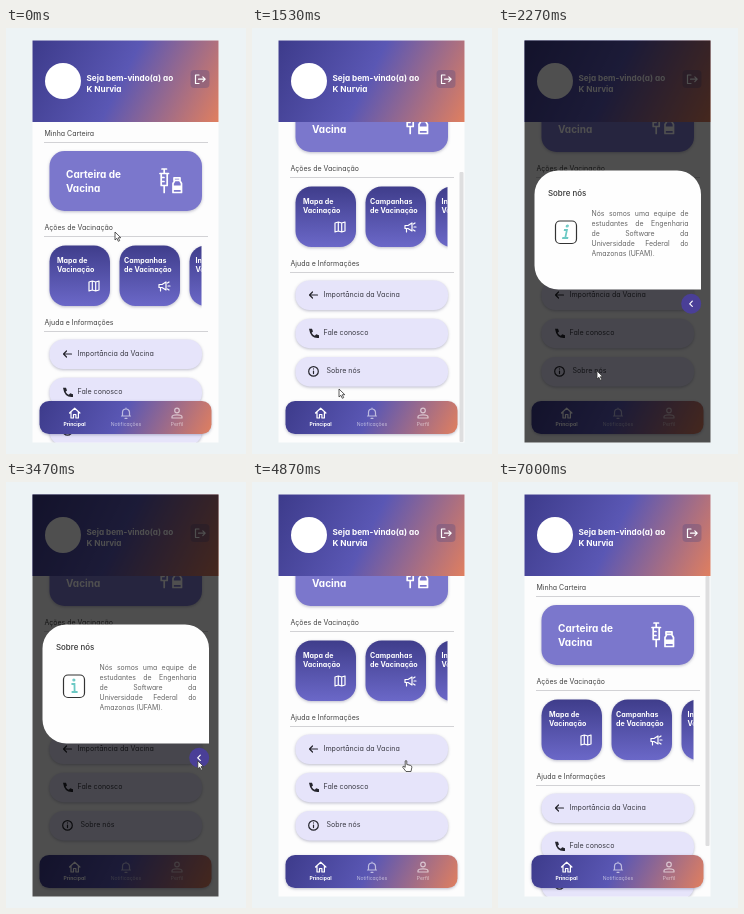
An HTML page that plays this animation: 240 px wide and 426 px high, repeating every 7070 ms.

```html
<!DOCTYPE html>
<html lang="pt-BR">
<head>
<meta charset="utf-8">
<title>Carteira de Vacina</title>
<style>
html, body { margin: 0; width: 100%; height: 100%; overflow: hidden; background: #edf3f5; }
svg.stage { display: block; width: 100%; height: 100%; }
text, p { font-family: Inter, "Open Sans", sans-serif; font-feature-settings: "cv11"; }
.bold { font-weight: 650; fill: #fff; }
.head { font-size: 7px; fill: #444; }
.item { font-size: 7.1px; fill: #3a3a44; }
.tile { font-size: 7.1px; }
.nav { font-size: 5.1px; text-anchor: middle; fill: #fff; }
.line { fill: none; stroke: #fff; stroke-width: 1.2; stroke-linecap: round; stroke-linejoin: round; }
.thick { stroke-width: 1.7; }
.dark { stroke: #25252d; }
.lift { filter: drop-shadow(0 1px 1.5px rgba(40, 40, 90, .3)); }
p { margin: 0; font-size: 6.9px; line-height: 10px; color: #666; }
p span { display: block; text-align: justify; text-align-last: justify; white-space: nowrap; }
p span:last-child { text-align-last: left; }
</style>
</head>
<body>
<svg class="stage" viewBox="0 0 240 426" xmlns="http://www.w3.org/2000/svg">
  <defs>
    <linearGradient id="brand">
      <stop offset="0" stop-color="#3d3b8b"/>
      <stop offset=".48" stop-color="#5a57b4"/>
      <stop offset="1" stop-color="#e07f5f"/>
    </linearGradient>
    <linearGradient id="top" href="#brand" gradientUnits="userSpaceOnUse" x1="29" y1="8" x2="210" y2="99"/>
    <linearGradient id="foot" href="#brand" gradientUnits="userSpaceOnUse" x1="44" y1="352" x2="195" y2="427"/>
    <linearGradient id="deep" x2="0" y2="1">
      <stop offset="0" stop-color="#3f3d8b"/>
      <stop offset="1" stop-color="#6b68c8"/>
    </linearGradient>
    <clipPath id="view"><rect x="26.500" y="94" width="186" height="320.500"/></clipPath>
    <clipPath id="row"><rect x="38" y="212" width="157.500" height="72"/></clipPath>
  </defs>

  <rect x="26.500" y="12.500" width="186" height="402" fill="#fdfdfd"/>

  <g clip-path="url(#view)">
    <g id="page">
      <g id="heads"></g>
      <rect class="lift" x="43.500" y="123" width="152.500" height="60" rx="15" fill="#7b77cc"/>
      <g class="bold" font-size="10">
        <text x="60" y="149.500">Carteira de</text>
        <text x="60" y="163.500">Vacina</text>
      </g>
      <path class="line thick" d="M156 141h4.500M158.200 141v4M154 145.500h8.500M155.200 145.500v12h6v-12M155.500 149.500h2.500M155.500 153.500h2.500M158.200 158v6.500"/>
      <path class="line thick" d="M168 149.800h6v2.500h-6zM168.500 153l-1.500 2.500v9h8.500v-9l-1.500-2.500"/>
      <path d="M167 157.500h8.500v4.500h-8.500z" fill="#fff"/>
      <g clip-path="url(#row)" id="tiles"></g>
      <g id="items"></g>
    </g>
    <rect id="bar" x="207.500" y="94" width="4" height="270" rx="1" fill="#dededf"/>
  </g>

  <rect x="26.500" y="12.500" width="186" height="81.500" fill="url(#top)"/>
  <circle cx="57" cy="53" r="18" fill="#fff"/>
  <g class="bold" font-size="8.200">
    <text x="80.500" y="53">Seja bem-vindo(a) ao</text>
    <text x="80.500" y="64">K Nurvia</text>
  </g>
  <rect x="184.500" y="42" width="19" height="18" rx="4" fill="#554a80" opacity=".35"/>
  <path class="line" d="M193 47h-3.500v8.500h3.500M192.500 51.200h6.500M196.800 48.800l2.400 2.400l-2.400 2.400"/>

  <rect class="lift" x="33.500" y="373" width="172" height="33" rx="9.500" fill="url(#foot)"/>
  <g>
    <path class="line" d="M63.500 385l5.200-4.800l5.200 4.800M65 384v6h2.500v-3.500h2.400v3.500h2.500v-6"/>
    <text class="nav" x="68.500" y="398" font-weight="700">Principal</text>
  </g>
  <g opacity=".6">
    <path class="line" d="M115.500 388h9M116.500 388v-3.500a3.500 3.500 0 0 1 7 0v3.500M120 380v1M119 390.300h2"/>
    <text class="nav" x="120" y="398">Notificações</text>
    <circle class="line" cx="171" cy="382.500" r="2.300"/>
    <path class="line" d="M166 390v-1.200q0-2 5-2t5 2v1.200z"/>
    <text class="nav" x="171" y="398">Perfil</text>
  </g>

  <g id="modal">
    <rect x="26.500" y="12.500" width="186" height="402" opacity=".69"/>
    <path d="M60.500 142.500h118.500a24 24 0 0 1 24 24v95h-142.500a24 24 0 0 1-24-24v-71a24 24 0 0 1 24-24z" fill="#fefefe"/>
    <text x="50" y="168" font-size="7.900" font-weight="500" fill="#333">Sobre nós</text>
    <rect x="57.500" y="193" width="21" height="22.500" rx="4.500" fill="#fff" stroke="#333" stroke-width="1.200"/>
    <g id="info" fill="none" stroke="#6cc9c4" stroke-width="1.800">
      <path d="M-2.500-2h3v8M-2.500 6h6"/>
      <circle cx="0" cy="-6" r=".7"/>
    </g>
    <foreignObject x="93.500" y="181" width="97" height="54">
      <p xmlns="http://www.w3.org/1999/xhtml"><span>Nós somos uma equipe de</span><span>estudantes de Engenharia</span><span>de Software da</span><span>Universidade Federal do</span><span>Amazonas (UFAM).</span></p>
    </foreignObject>
    <circle cx="193.200" cy="275.700" r="10" fill="#4a3f97"/>
    <path class="line" d="M194.300 273.200l-2.600 2.600l2.600 2.600"/>
  </g>

  <g id="cursor" fill="#fff" stroke="#333" stroke-width=".8" stroke-linejoin="round">
    <path id="arrow" d="M0 0v8l1.900-1.700l1.400 3l1.400-.7l-1.400-2.900h2.500z"/>
    <path id="hand" d="M-.8 1q.8-1.500 1.600 0v3.500l4 1q1.200.4 1 2l-.8 4h-5l-3.300-4.300q0-1.400 1.300-.8l1.200 1z"/>
  </g>
</svg>
<script>
const LOOP = 7070, SCROLL = 59;
const $ = id => document.getElementById(id);

$('heads').innerHTML = [['Minha Carteira', 108], ['Ações de Vacinação', 202.3], ['Ajuda e Informações', 297.3]]
  .map(([label, y]) => `<text class="head" x="38.5" y="${y}">${label}</text>
    <path d="M38 ${Math.round(y) + 6.5}h164" stroke="#d2d2d5"/>`).join('');

const tileIcons = [
  'M83 254l3.300-1l3.400 1l3.300-1v9l-3.300 1l-3.400-1l-3.300 1zM86.300 253v9M89.700 254v9',
  'M153 256.500h3l4-2.500v8l-4-2.500h-3zM154.500 260v3M162 258h2M161.500 255l1.500-1M161.500 261l1.500 1',
  ''
];
$('tiles').innerHTML = [['Mapa de', 'Vacinação', 51], ['Campanhas', 'de Vacinação', 118], ['Info', 'Vacinas', 189.5]]
  .map(([a, b, x], i) => `
    <rect class="lift" x="${43.5 + 70 * i}" y="217.5" width="60.5" height="60.5" rx="16" fill="url(#deep)"/>
    <text class="bold tile" x="${x}" y="234.5">${a}</text>
    <text class="bold tile" x="${x}" y="244">${b}</text>
    <path class="line" d="${tileIcons[i]}"/>`).join('');

const itemIcons = [
  '<path class="line dark" d="M65.500 326h-8M60.500 323l-3 3l3 3"/>',
  '<path fill="#25252d" d="M57 321.500h3l1 2.800l-1.400 1.200q1.300 2.300 3.200 3l1.400-1.400l2.800 1v2.700q-8.500 1-10-9.300z"/>',
  '<circle class="line dark" cx="61.500" cy="326" r="4.800"/><path class="line dark" d="M61.500 325.700v2.500M61.500 323.500v.1"/>'
];
$('items').innerHTML = ['Importância da Vacina', 'Fale conosco', 'Sobre nós']
  .map((label, i) => `<g transform="translate(0 ${38.2 * i})">
    <rect class="lift" x="43.500" y="311.500" width="152.500" height="29.500" rx="14" fill="#e6e4fa"/>
    ${itemIcons[i]}<text class="item" x="${i < 2 ? 71.5 : 74.5}" y="327.7">${label}</text></g>`).join('');

// Cursor stops: time, x, y
const path = [
  [0, 109, 204], [600, 109, 205], [1000, 103, 245], [1530, 87, 361], [1850, 99, 343], [2350, 99, 343],
  [2900, 140, 370], [3550, 194, 275], [4070, 196, 278], [4300, 194, 279], [4700, 154, 278],
  [4950, 154, 278], [5500, 228, 190], [5880, 186, 100], [LOOP, 186, 100]
];
const ramp = (t, a, b) => Math.min(1, Math.max(0, (t - a) / (b - a)));
const ease = u => u * u * (3 - 2 * u);

function draw(t) {
  const down = SCROLL * (ease(ramp(t, 600, 1020)) - ease(ramp(t, 4950, 5380)));
  $('page').setAttribute('transform', `translate(0 ${-down})`);
  $('bar').setAttribute('y', 94 + down * 50 / SCROLL);
  $('bar').style.opacity = (t >= 70 && t < 2000) || t > 4940 ? 1 : 0;

  $('modal').style.opacity = ramp(t, 1960, 2200) - ramp(t, 3850, 4100);
  const sway = 12 * Math.cos((t - 2270) / 260);
  $('info').setAttribute('transform', `translate(68 204) skewX(${-sway})`);

  const i = path.findIndex((p, k) => k && t < p[0]);
  const [t0, x0, y0] = path[i - 1], [t1, x1, y1] = path[i];
  const u = ease(ramp(t, t0, t1));
  $('cursor').setAttribute('transform', `translate(${x0 + (x1 - x0) * u} ${y0 + (y1 - y0) * u})`);
  $('cursor').style.display = t < 6070 ? '' : 'none';
  const pointing = t > 4450 && t < 5050;
  $('hand').style.display = pointing ? '' : 'none';
  $('arrow').style.display = pointing ? 'none' : '';
}

const start = performance.now();
function tick() {
  draw((performance.now() - start) % LOOP);
  requestAnimationFrame(tick);
}
tick();
</script>
</body>
</html>
```
